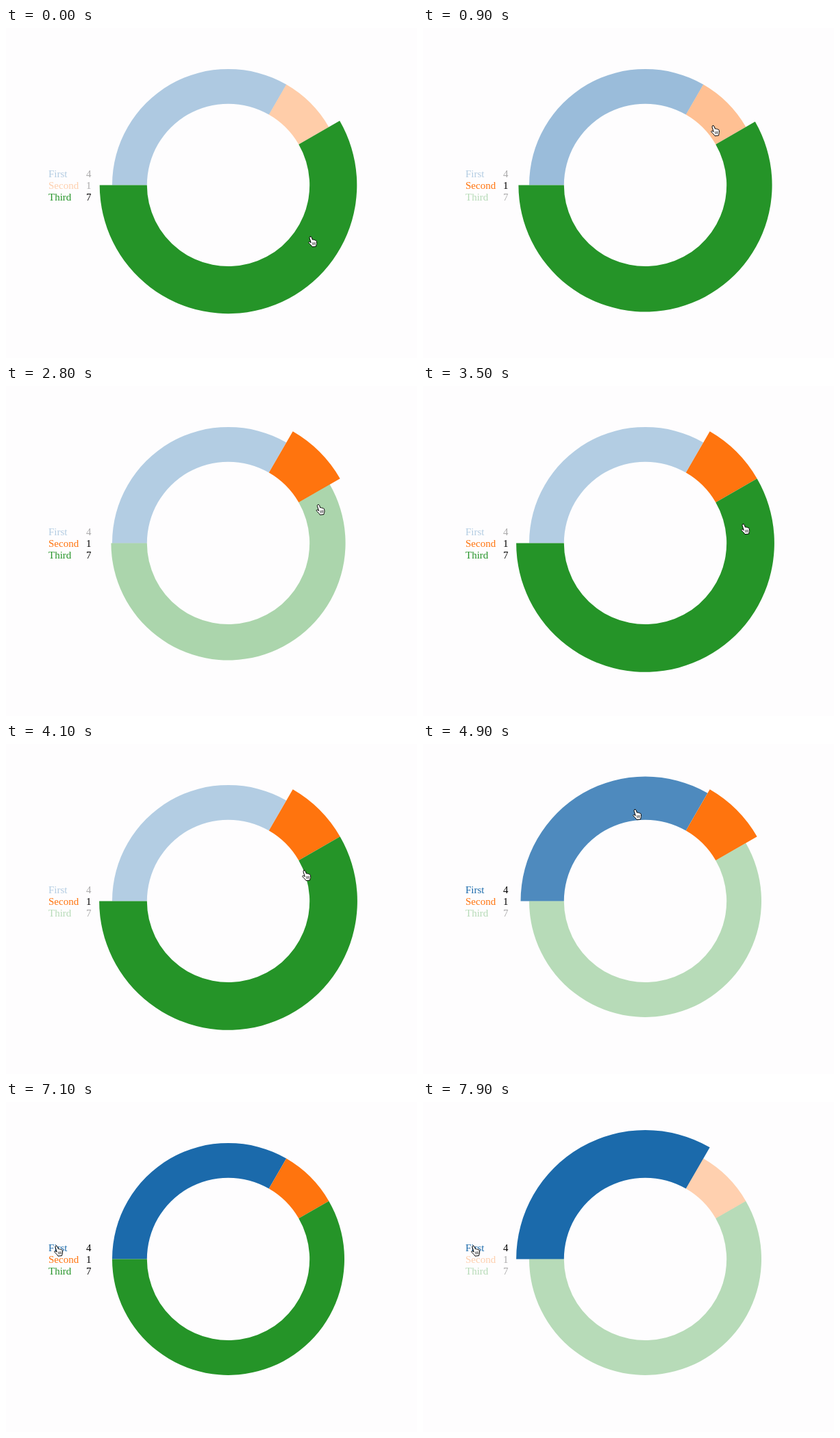
These frames come from a looping animation (600 px wide and 482 px high, 8 s). An HTML page:

```html
<!DOCTYPE html>
<html lang="en">
<head>
<meta charset="utf-8">
<title>Donut chart</title>
<style>
  html, body { margin: 0; width: 100%; height: 100%; overflow: hidden; background: #fefdfe; }
  svg { display: block; width: 600px; height: 482px; }
  text { font: 15px "Liberation Serif", "Times New Roman", serif; }
</style>
</head>
<body>
<svg viewBox="0 0 600 482">
  <g id="arcs"></g>
  <g id="legend"></g>
  <g id="hand" stroke="#000" stroke-linejoin="round" stroke-linecap="round">
    <path fill="#fff" d="M3.2 .8C4.2 .4 5 1 5.3 2L6.4 5.3C7.4 4.6 8.4 5 8.6 5.8C9.4 5.2 10.4 5.6 10.6 6.4C11.6 6 12.2 6.6 12.3 7.5L12.6 10.5C12.6 12 11.8 13 11.6 15L6 15.6C5.4 14 2.4 11.5 1 9.8C.2 8.8 1.4 7.8 2.6 8.6L4.2 9.6L2 2.6C1.7 1.8 2.2 1 3.2 .8Z"/>
    <path fill="none" stroke-width=".7" d="M6.4 9.6L7 12.6M8.3 9.3L8.8 12.4M10.2 9.1L10.5 12.2"/>
  </g>
</svg>
<script>
const LOOP = 8000, TICK = 100, FADE = 400;
const CX = 324.5, CY = 229.4, INNER = 118.7, OUTER = 169.5, GROWN = 188.4;
const DIM = 0.33;
const FIRST = 1, SECOND = 2, THIRD = 4;

const slices = [
  { name: "First", value: 4, color: "#1b6aab" },
  { name: "Second", value: 1, color: "#ff740e" },
  { name: "Third", value: 7, color: "#259428" }
];

// time, highlighted slices
const events = [
  [-1000, 0], [-320, THIRD], [720, 0], [860, SECOND],
  [2690, SECOND | THIRD], [4100, SECOND], [4676, FIRST | SECOND],
  [5550, SECOND], [6114, 0], [7110, FIRST]
];

// time, x, y of the pointer
const path = [
  [0, 441, 304], [400, 441, 304], [720, 429, 196], [900, 420, 142], [1100, 415, 121],
  [2300, 415, 121], [2690, 446, 157], [3000, 464, 201], [3800, 464, 201],
  [4100, 432, 184], [4676, 313, 110], [4900, 306, 95], [5350, 306, 95],
  [5550, 394, 103], [5800, 431, 126], [6250, 431, 126], [7000, 70, 209.5]
];

function add(parent, tag, attrs, text = "") {
  const el = document.createElementNS("http://www.w3.org/2000/svg", tag);
  for (const key in attrs) el.setAttribute(key, attrs[key]);
  el.textContent = text;
  return document.getElementById(parent).appendChild(el);
}

let angle = -Math.PI;
slices.forEach((s, i) => {
  s.from = angle;
  s.to = angle += s.value / 12 * 2 * Math.PI;
  s.arc = add("arcs", "path", { fill: s.color });
  const y = 218 + i * 17;
  s.texts = [
    add("legend", "text", { x: 62, y, fill: s.color }, s.name),
    add("legend", "text", { x: 117, y, fill: "#000" }, s.value)
  ];
});

const clamp = x => Math.min(1, Math.max(0, x));
const mix = (a, b, p) => a + (b - a) * p;
const cubic = x => x < 0.5 ? 4 * x ** 3 : 1 - 4 * (1 - x) ** 3;
const isOn = (mask, i) => mask >> i & 1;
const isLit = (mask, i) => mask ? isOn(mask, i) : 1;

// Each event restarts the transition from wherever the value has got to.
function track(t, i, target) {
  let v = target(events[0][1], i);
  events.forEach(([start, mask], k) => {
    if (start > t) return;
    const end = k + 1 < events.length ? Math.min(t, events[k + 1][0]) : t;
    v = mix(v, target(mask, i), cubic(clamp((end - start) / FADE)));
  });
  return v;
}

function ring(r, a, b) {
  const at = (rad, ang) => `${CX + rad * Math.cos(ang)} ${CY + rad * Math.sin(ang)}`;
  const big = b - a > Math.PI ? 1 : 0;
  return `M${at(r, a)}A${r} ${r} 0 ${big} 1 ${at(r, b)}` +
    `L${at(INNER, b)}A${INNER} ${INNER} 0 ${big} 0 ${at(INNER, a)}Z`;
}

function pointer(t) {
  const k = path.findIndex(p => p[0] > t);
  if (k < 0) return path[path.length - 1].slice(1);
  const [a, b] = [path[k - 1], path[k]];
  const p = (t - a[0]) / (b[0] - a[0]);
  return [mix(a[1], b[1], p), mix(a[2], b[2], p)];
}

const hand = document.getElementById("hand");

function draw(t) {
  const mask = events.filter(e => e[0] <= t).pop()[1];
  slices.forEach((s, i) => {
    s.arc.setAttribute("d", ring(mix(OUTER, GROWN, track(t, i, isOn)), s.from, s.to));
    s.arc.setAttribute("opacity", mix(DIM, 1, track(t, i, isLit)));
    s.texts.forEach(el => el.setAttribute("opacity", isLit(mask, i) ? 1 : DIM));
  });
  hand.setAttribute("transform", `translate(${pointer(t)})`);
}

const begin = performance.now();
function frame() {
  const t = (performance.now() - begin) % LOOP;
  draw(Math.floor(t / TICK) * TICK);
  requestAnimationFrame(frame);
}
frame();
</script>
</body>
</html>
```
